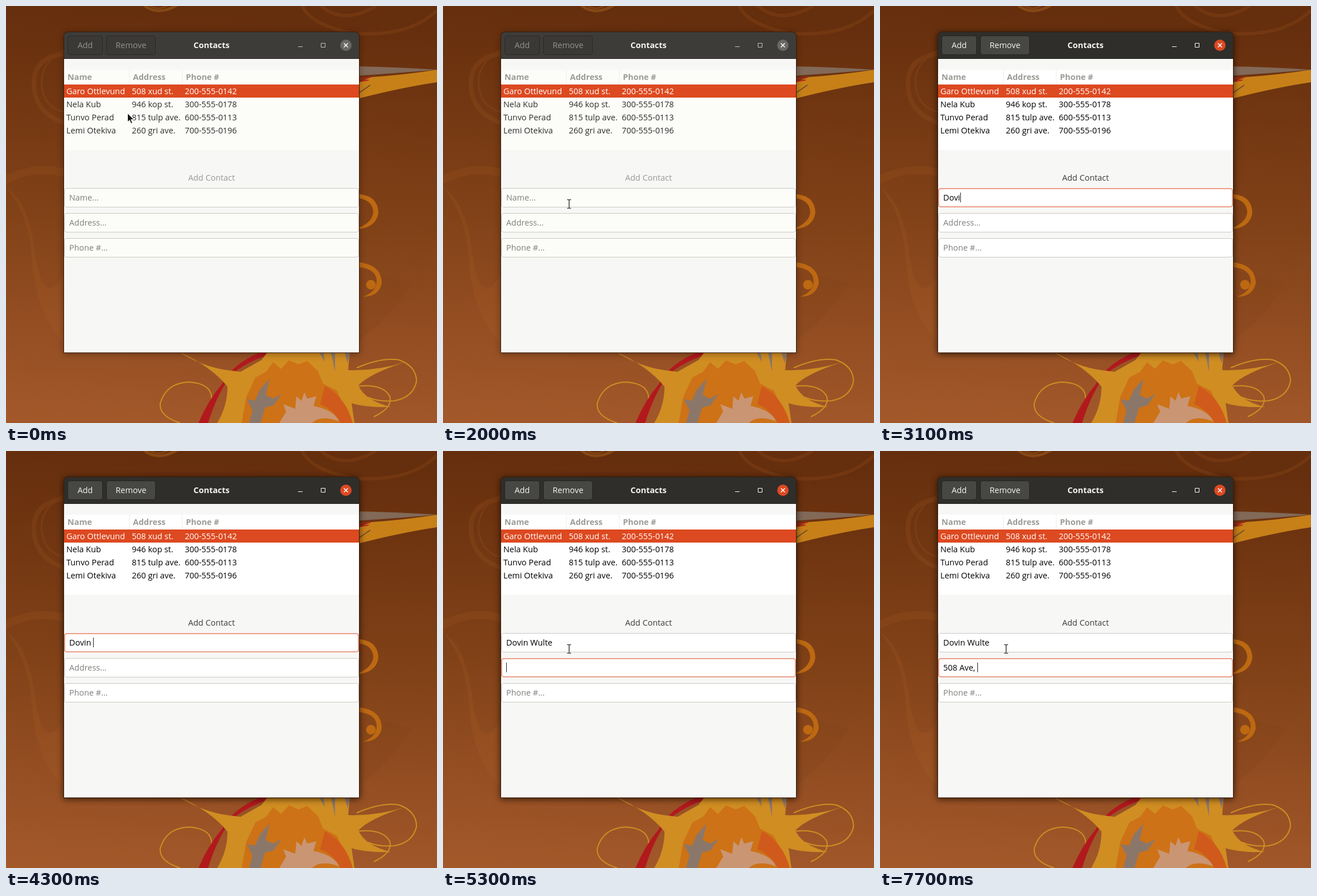
Recreate the animation shown at these times as an HTML page. Size 757 by 733 pixels, loop 8 s.

```html
<!DOCTYPE html>
<html lang="en">
<head>
<meta charset="utf-8">
<title>Contacts</title>
<style>
html, body { margin: 0; width: 100%; height: 100%; overflow: hidden; background: #84441a; }
svg {
  display: block; width: 100vw; height: 100vh;
  --bar: #3e3c39; --barText: #94928e; --button: #3b3936; --edge: #2a2927; --icon: #c4c3c0;
  --close: #6b6965; --base: #fcfdf9; --ink: #2d2d2b; --label: #999894; --shadow: #0005;
}
svg.active {
  --bar: #2f2e2b; --barText: #f4f4f2; --button: #474743; --edge: #252522; --icon: #fff;
  --close: #de4921; --base: #fff; --ink: #000; --label: #3b3b39; --shadow: #000a;
}
text { font: 14.4px "Open Sans", "Noto Sans", sans-serif; fill: var(--ink); white-space: pre; }
.bold { font-weight: 700; }
.outline { fill: #3a1c0a; filter: drop-shadow(0 2px 6px var(--shadow)); }
.bar { fill: var(--bar); }
.button rect { fill: var(--button); stroke: var(--edge); }
.button text { fill: var(--barText); text-anchor: middle; }
.base { fill: var(--base); }
.icon { fill: none; stroke: var(--icon); }
.heading { fill: #9c9b97; }
.hint { fill: #7e7f7b; }
</style>
</head>
<body>
<svg id="stage" viewBox="0 0 757 733" preserveAspectRatio="none">
  <defs>
    <linearGradient id="sky" x1=".05" y1="0" x2="0" y2="1">
      <stop offset="0" stop-color="#652e0d"/>
      <stop offset=".5" stop-color="#824218"/>
      <stop offset="1" stop-color="#a4592b"/>
    </linearGradient>
  </defs>

  <g id="wallpaper">
    <rect width="757" height="733" fill="url(#sky)"/>
    <g fill="none" stroke="#a45c22" opacity=".2">
      <path stroke-width="8" d="M104 84Q48 90 49 138Q50 188 104 206"/>
      <path stroke-width="3" d="M104 76Q57 101 63 143Q68 179 104 187"/>
      <path stroke-width="14" d="M-5 308Q48 278 106 294"/>
      <path stroke-width="4" d="M0 668Q40 632 76 681Q87 712 52 720M76 681Q130 642 178 690T270 700"/>
      <path stroke-width="6" d="M519 -5Q528 30 604 47M548 -5Q589 36 650 0M602 47Q705 58 757 8"/>
    </g>
    <path fill="#b66b2d" opacity=".13" d="M0 318Q42 370 46 452Q52 540 100 590V475Q66 530 52 440Q43 347 0 318Z"/>
    <path fill="#6e3510" opacity=".1" d="M620 462L712 488Q672 552 620 587Z"/>
    <g fill="none" stroke="#854815">
      <path stroke-width="5" d="M242 -2Q266 19 301 -2"/>
      <path stroke-width="2" d="M251 -2Q268 10 286 -2"/>
    </g>

    <path fill="#826958" d="M610 106Q681 107 757 112Q690 118 610 123Z"/>
    <path fill="#c78018" d="M610 138L641 125Q700 121 757 112V134Q690 144 610 165Z"/>
    <path fill="none" stroke="#b3231e" stroke-width="2" d="M612 130L641 125M614 134L637 130"/>
    <path fill="none" stroke="#73512d" stroke-width="2" d="M618 154L640 139"/>

    <g fill="#bd6912">
      <path d="M610 330Q654 330 654 364Q650 391 612 393Q644 382 645 362Q644 338 610 337Z"/>
      <path d="M610 450Q659 451 660 487Q655 511 627 511Q652 502 651 482Q649 459 610 458Z"/>
      <circle cx="641" cy="490" r="8.5"/>
    </g>

    <g fill="none" stroke="#cf8e22" stroke-width="2">
      <path d="M306 733Q268 721 271 698Q282 662 322 661Q364 664 361 694"/>
      <path d="M616 636Q660 617 690 622Q721 633 721 660Q715 688 682 694Q655 696 636 688"/>
      <path d="M620 668Q662 664 674 686Q680 706 646 722"/>
    </g>
    <path fill="#b1191d" d="M476 608Q420 625 394 650Q369 686 355 733H338Q355 693 379 665Q396 630 448 608Z"/>
    <path fill="#d08d22" d="M302 607Q345 634 388 640L412 643L449 622L462 605H604L601 640Q652 642 704 625Q638 646 619 667Q630 693 676 705Q630 706 607 698L612 733H371Q389 703 389 669Q360 633 302 607Z"/>
    <path fill="#cd7216" d="M414 733L422 687L438 653L457 643L469 626L483 638L497 623L514 630L529 624L548 642L557 664L581 676L608 733Z"/>
    <path fill="#8b776a" d="M463 655L456 684L469 690L484 682L470 702L455 706L447 733H427L433 711L423 691L437 694L446 674ZM551 610L560 626L558 610ZM571 610L578 643V610ZM595 610L600 628L604 610Z"/>
    <path fill="#ca9573" d="M480 733L492 713L487 700L508 708L510 686L519 694L524 679L529 690L545 686L540 703Q576 710 585 730Q553 718 537 733Z"/>
    <path fill="#d05a1b" d="M560 668Q597 688 609 733H588Q574 708 552 700Z"/>
  </g>

  <path class="outline" d="M101 610V54Q101 45 110 45H612Q621 45 621 54V610Z"/>
  <path fill="#f7f7f6" d="M102 93H620V609H102Z"/>
  <path class="bar" d="M102 93V54Q102 46 110 46H612Q620 46 620 54V93Z"/>
  <path d="M102 92.5H620" stroke="#20201e" opacity=".7"/>
  <g class="button"><rect x="108.5" y="52.5" width="61" height="33" rx="4"/><text x="139" y="74">Add</text></g>
  <g class="button"><rect x="176.5" y="52.5" width="86" height="33" rx="4"/><text x="219.5" y="74">Remove</text></g>
  <text class="bold" x="361" y="74" text-anchor="middle" style="fill:#f5f5f3">Contacts</text>
  <path class="icon" d="M513 71.5H521M553.5 65.5H560.5V72.5H553.5Z"/>
  <circle cx="597" cy="69" r="10" fill="var(--close)"/>
  <path d="M593.5 65.5L600.5 72.5M600.5 65.5L593.5 72.5" stroke="#fff" stroke-width="1.5"/>

  <rect class="base" x="102" y="112" width="518" height="141"/>
  <path d="M216.5 112V138M309.5 112V138" stroke="#eeeeeb"/>
  <rect x="102" y="138" width="518" height="23" fill="#dd4920"/>
  <g id="table"></g>
  <text x="361" y="307" text-anchor="middle" style="fill:var(--label)">Add Contact</text>
  <g id="form"></g>
  <path id="caret" stroke="#222"/>
  <path id="arrow" fill="#151515" stroke="#fff" d="M.5 .5V16L4 12.7L6.6 18.6L9.2 17.4L6.6 11.7H11.5Z"/>
  <g id="beam" fill="none">
    <path stroke="#fff" stroke-width="3" d="M-3 -7.5H3M0 -7V7M-3 7.5H3"/>
    <path stroke="#111" stroke-width="1.2" d="M-3.5 -7.5H-.8L0 -6.5L.8 -7.5H3.5M0 -7V7M-3.5 7.5H-.8L0 6.5L.8 7.5H3.5"/>
  </g>
</svg>
<script>
const LOOP = 8000, STEP = 100;
const ACTIVATE = 2300, TYPING = 2900, TAB = 5100;
const byId = id => document.getElementById(id);

function add(parent, tag, attributes, content = "") {
  const node = document.createElementNS("http://www.w3.org/2000/svg", tag);
  for (const key in attributes) node.setAttribute(key, attributes[key]);
  node.textContent = content;
  return parent.appendChild(node);
}

["Name", "Address", "Phone #"].forEach((title, i) =>
  add(byId("table"), "text", { class: "bold heading", x: [108, 223, 316][i], y: 130 }, title));

[
  ["Garo Ottlevund", "508 xud st.", "200-555-0142"],
  ["Nela Kub", "946 kop st.", "300-555-0178"],
  ["Tunvo Perad", "815 tulp ave.", "600-555-0113"],
  ["Lemi Otekiva", "260 gri ave.", "700-555-0196"],
].forEach((row, r) => row.forEach((value, c) => add(byId("table"), "text", {
  x: [106, 221, 314][c], y: 155 + 23 * r, style: r ? "" : "fill:#fff",
}, value)));

// keys: [time, number of characters typed so far]
const fields = [
  { hint: "Name...", value: "Dovin Wulte", from: ACTIVATE, to: TAB, fade: 0.75,
    keys: [[2900, 1], [3100, 4], [3300, 5], [4300, 6], [4400, 8], [4700, 10], [4800, 11]] },
  { hint: "Address...", value: "508 Ave, ", from: TAB, to: Infinity, fade: 0.3,
    keys: [[6000, 1], [6100, 2], [6300, 3], [6800, 5], [7000, 6], [7100, 7], [7600, 8], [7700, 9]] },
  { hint: "Phone #...", value: "", from: Infinity, to: Infinity, fade: 0, keys: [] },
];
fields.forEach((field, i) => {
  field.y = 320 + 44 * i;
  const box = { x: 102.5, y: field.y + 0.5, width: 517, height: 33, rx: 4 };
  add(byId("form"), "rect", { ...box, class: "base", stroke: "#cbc7c2" });
  field.ring = add(byId("form"), "rect",
    { ...box, x: 103, y: field.y + 1, width: 516, height: 32, fill: "none", stroke: "#ee9f89", "stroke-width": 2 });
  field.text = add(byId("form"), "text", { x: 111, y: field.y + 22 });
});

const latest = (list, t, start) => list.reduce((last, item) => item[0] <= t ? item : last, start);
const clamp = v => Math.max(0, Math.min(1, v));

const pointerPath = [
  [0, 213, 188], [1300, 175, 203], [1400, 163, 198], [1600, 168, 215], [1700, 185, 250],
  [1800, 205, 294], [1900, 218, 331], [2000, 221.5, 348],
];

function drawField(field, t) {
  const { from, to, fade, keys, value } = field;
  const touched = t >= from;
  const fadeIn = clamp(fade + (t - from) / 300);
  const fadeOut = t < to ? 1 : clamp(0.6 - (t - to) / 300);
  field.ring.style.opacity = touched ? fadeIn * fadeOut : 0;
  field.text.textContent = touched ? value.slice(0, latest(keys, t, [0, 0])[1]) : field.hint;
  field.text.setAttribute("class", touched ? "" : "hint");
  if (touched && t < to) {
    const x = Math.round(111 + field.text.getComputedTextLength()) + 0.5;
    byId("caret").setAttribute("d", `M${x} ${field.y + 8}v17`);
  }
}

function draw(now) {
  const t = Math.floor((now % LOOP) / STEP) * STEP;
  byId("stage").classList.toggle("active", t >= ACTIVATE);
  byId("caret").style.display = t >= ACTIVATE ? "" : "none";
  fields.forEach(field => drawField(field, t));

  const [, x, y] = latest(pointerPath, t, pointerPath[0]);
  const hidden = t >= TYPING && t < TAB;
  const overEntry = y > 320;
  for (const [id, shown] of [["arrow", !overEntry], ["beam", overEntry]]) {
    byId(id).setAttribute("transform", `translate(${x} ${y})`);
    byId(id).style.display = shown && !hidden ? "" : "none";
  }
  requestAnimationFrame(() => draw(performance.now() - start));
}
const start = performance.now();
draw(0);
</script>
</body>
</html>
```
